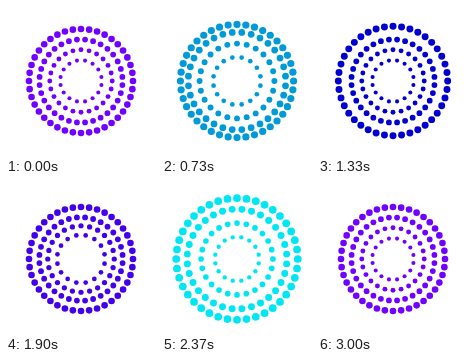
An HTML page with a canvas that plays this animation: 150 px wide and 150 px high, repeating every 3030 ms.

```html
<!DOCTYPE html>
<html lang="en">
<head>
<meta charset="utf-8">
<title>Pulsing dot rings</title>
<style>
html, body { margin: 0; width: 100%; height: 100%; overflow: hidden; background: #fff; }
canvas { display: block; width: 150px; height: 150px; }
</style>
</head>
<body>
<canvas id="stage" width="150" height="150"></canvas>
<script>
const ctx = document.getElementById('stage').getContext('2d');
const LOOP = 3030, HOLD = 170, PERIOD = 1500, PULSE = 1000;
const TAU = Math.PI * 2;

const mix = (a, b, k) => a + (b - a) * k;
const clamp = k => Math.min(1, Math.max(0, k));

// Violet to deep blue to cyan and back
function colour(phase) {
  const p = 0.5 + 0.5 * Math.cos(TAU * (phase - 910) / PERIOD);
  const toBlue = clamp((p - 0.11) / 0.3);
  const toCyan = clamp((p - 0.55) / 0.45);
  const r = mix(112, 0, toBlue);
  const g = mix(0, 235, toCyan ** 1.2);
  const b = mix(255, 207, toBlue) + 38 * toCyan ** 4;
  return `rgb(${r}, ${g}, ${b})`;
}

function swell(time) {
  const k = clamp(time / PULSE);
  return 1 + 0.2 * Math.sin(Math.PI * k) ** 2;
}

function draw(now) {
  const time = now % LOOP;
  const phase = time < HOLD || time >= 2 * PERIOD ? 0 : time % PERIOD;
  ctx.fillStyle = '#fff';
  ctx.fillRect(0, 0, 150, 150);
  ctx.fillStyle = colour(phase);
  // Evenly spaced dots; every other ring is turned by half a step
  for (let ring = 2; ring <= 5; ring++) {
    const scale = swell(phase - mix(60, 500, (ring - 2) / 3));
    const radius = 10.4 * ring * scale;
    const dot = (1.2 + 0.42 * ring) * scale;
    const count = 8 * ring;
    const shift = ring % 2 ? 0 : 0.5;
    for (let i = 0; i < count; i++) {
      const angle = TAU * ((i + shift) / count - 0.25);
      ctx.beginPath();
      ctx.arc(75 + radius * Math.cos(angle), 75 + radius * Math.sin(angle), dot, 0, TAU);
      ctx.fill();
    }
  }
}

const start = performance.now();
function tick() {
  draw(performance.now() - start);
  requestAnimationFrame(tick);
}
tick();
</script>
</body>
</html>
```
